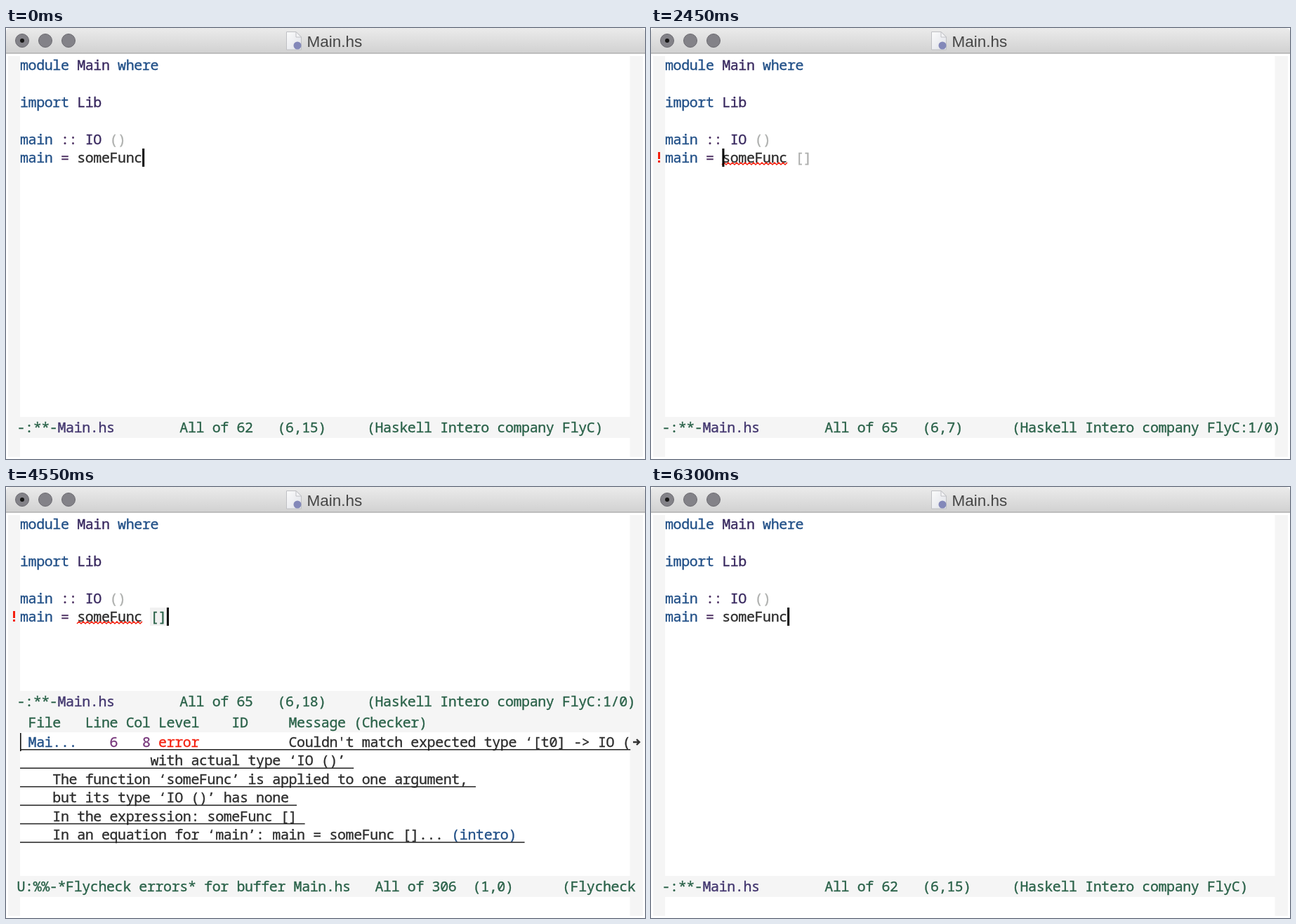
An HTML page that plays this animation: 910x615 px, repeating every 7.35 s.

```html
<!DOCTYPE html>
<html lang="en">
<head>
<meta charset="utf-8">
<title>Editor error checking</title>
<style>
html, body { margin: 0; width: 100%; height: 100%; overflow: hidden; background: #fff; }
svg { display: block; width: 910px; height: 615px; }
text { font: 20px "Noto Sans Mono", monospace; letter-spacing: -.41px; white-space: pre; color: #2d2d2d; }
text, tspan { fill: currentColor; stroke: currentColor; stroke-width: .35px; }
.title { font: 22.5px "Liberation Sans", Arial, sans-serif; letter-spacing: 0; color: #464646; stroke: none; }
.key { color: #204f87; }
.type { color: #38285f; }
.op { color: #4b2f61; }
.dim { color: #aeb0ae; }
.mode { color: #2a6249; }
.buffer { color: #43376f; }
.number { color: #78387c; }
.error { color: #f5200f; }
.wave { fill: none; stroke: #f5200f; stroke-width: 1.5; }
</style>
</head>
<body>
<svg viewBox="0 0 910 615">
  <defs>
    <linearGradient id="bar" x2="0" y2="1">
      <stop stop-color="#ebebeb"/><stop offset="1" stop-color="#d1d1d1"/>
    </linearGradient>
    <linearGradient id="page" x2="1" y2="1">
      <stop stop-color="#fbfbfb"/><stop offset="1" stop-color="#dfe1e8"/>
    </linearGradient>
  </defs>
  <path d="M0 36V6Q0 0 6 0H904Q910 0 910 6V36Z" fill="url(#bar)"/>
  <path d="M0 36H910" stroke="#b0b0b0" stroke-width="1.5"/>
  <g fill="#838288" stroke="#6c6b71">
    <circle cx="23" cy="18" r="9.5"/><circle cx="56" cy="18" r="9.5"/><circle cx="89" cy="18" r="9.5"/>
  </g>
  <circle cx="23" cy="18" r="3" fill="#161616"/>
  <path d="M399.5 5.5H413L420.5 13V31H399.5Z" fill="url(#page)" stroke="#bfc0c4"/>
  <path d="M413 5.5V13H420.5Z" fill="#f4f4f6" stroke="#bfc0c4"/>
  <circle cx="415" cy="25" r="5.5" fill="#8388b9"/>
  <text class="title" x="428.5" y="26.5">Main.hs</text>
  <path d="M3 40H20V612H3ZM888.5 40H907V612H888.5Z" fill="#f5f5f5"/>
  <g id="screen"></g>
</svg>
<script>
const LOOP = 7350, CELL = 11.59, ROW = 26.45, LEFT = 20;
const screen = document.getElementById("screen");

// Each step changes only the listed parts of the state before it.
const steps = [
  { at: 0, tail: "", size: 62, col: 15, match: false, errorRow: 0, popup: "", saved: false },
  { at: 350, tail: " [", size: 64, col: 17 },
  { at: 700, tail: " []", size: 65, col: 18, saved: true },
  { at: 1050, match: true, errorRow: 6 },
  { at: 1400, saved: false },
  { at: 2100, col: 17, match: false },
  { at: 2450, col: 7 },
  { at: 2800, popup: "message" },
  { at: 4200, popup: "", col: 18, match: true },
  { at: 4550, popup: "mismatch" },
  { at: 4900, tail: " [", size: 64, col: 17, match: false },
  { at: 5250, errorRow: 7, popup: "parse", saved: true },
  { at: 5600, tail: " ", size: 63, col: 16, errorRow: 0, popup: "empty" },
  { at: 5950, tail: "", size: 62, col: 15, saved: false },
  { at: 6300, popup: "" }
];
steps.forEach((step, i) => { steps[i] = { ...steps[i - 1], ...step }; });

const details = [
  " ".repeat(16) + "with actual type ‘IO ()’",
  "    The function ‘someFunc’ is applied to one argument,",
  "    but its type ‘IO ()’ has none",
  "    In the expression: someFunc []",
  "    In an equation for ‘main’: main = someFunc []"
];

const column = n => LEFT + n * CELL;
const span = (cls, s) => `<tspan class="${cls}">${s}</tspan>`;
const text = (x, y, content, cls = "") => `<text x="${x}" y="${y}" class="${cls}">${content}</text>`;
const rect = (x, y, w, h, fill) => `<rect x="${x}" y="${y}" width="${w}" height="${h}" fill="${fill}"/>`;
const lines = (y, list) => list.map((s, i) => text(LEFT, y + i * ROW, s)).join("");
const thinCursor = y => rect(20, y, 1.6, 26, "#111");

function wave(from, to, y) {
  let d = `M${from} ${y + 3}`;
  for (let x = from + 3, up = true; x <= to; x += 3, up = !up) d += `L${x} ${up ? y : y + 3}`;
  return `<path class="wave" d="${d}"/>`;
}

function modeLine(y, flags, name, size, position, modes) {
  const status = `All of ${size}`.padEnd(12) + position.padEnd(11) + modes;
  return rect(3, y, 904, 30, "#f5f5f5") + text(15.5, y + 22, `${flags}${name}   ${status}`, "mode");
}

function code(s) {
  const tail = s.match ? ` ${span("mode", "[]")}` : span("dim", s.tail);
  const rows = [
    `${span("key", "module")} ${span("type", "Main")} ${span("key", "where")}`,
    "",
    `${span("key", "import")} ${span("type", "Lib")}`,
    "",
    `${span("key", "main")} ${span("op", "::")} ${span("type", "IO")} ${span("dim", "()")}`,
    `${span("key", "main")} ${span("op", "=")} someFunc${tail}`
  ];
  let out = s.match ? rect(205, 172, 23.5, 26, "#f1f1f1") : "";
  out += lines(59.8, rows);
  if (s.errorRow) {
    const top = 177 + (s.errorRow - 6) * 27;
    out += rect(10, top, 3, 10, "#f5200f") + rect(10, top + 12, 3, 3, "#f5200f");
    out += s.errorRow === 6 ? wave(101, 194, 192) : wave(20, 32, 218.5);
  }
  return out + rect(column(s.col) + .3, 172, 3, 26, "#000");
}

function errorRow(line, col, message) {
  const cells = " " + span("key", "Mai...") + "    " + span("number", line) + "   " +
    span("number", col) + " " + span("error", "error") + " ".repeat(11) + message;
  return text(LEFT, 371, cells) +
    '<path d="M893 364H902M898 360L902 364L898 368" fill="none" stroke="#333" stroke-width="2.4"/>';
}

function errorList(kind) {
  const size = { mismatch: 306, parse: 113, empty: 0 }[kind];
  const header = " File   Line Col Level    ID     Message (Checker)";
  let out = rect(3, 321, 904, 29, "#f5f5f5") + text(LEFT, 343, header, "mode");
  if (kind === "parse") out += errorRow(8, 1, "parse error (possibly incorrect indentatio");
  if (kind === "mismatch") {
    const tail = "... ", link = "(intero)";
    out += errorRow(6, 8, "Couldn't match expected type ‘[t0] -> IO (");
    out += lines(371 + ROW, details.map((s, i) => i === 4 ? s + tail + span("key", link) : s));
    const ends = [75, ...details.map((s, i) => s.length + 1 + (i === 4 ? tail.length + link.length : 0))];
    out += ends.map((n, i) => rect(LEFT, 374 + i * ROW, n * CELL, 1.5, "#222")).join("");
  }
  return out + thinCursor(351) +
    modeLine(555, "U:%%-", "*Flycheck errors* for buffer Main.hs", size, "(1,0)", "(Flycheck");
}

function messageWindow() {
  return lines(341, ["Couldn't match expected type ‘[t0] -> IO ()’", ...details]) + thinCursor(321) +
    modeLine(555, "U:**-", span("buffer", "*Flycheck error messages*"), 260, "(1,0)", "(Fundamental)");
}

function draw(s) {
  const checker = s.errorRow ? "FlyC:1/0" : "FlyC";
  let out = code(s) + modeLine(s.popup ? 291 : 555, "-:**-", span("buffer", "Main.hs") + " ".repeat(5),
    s.size, `(6,${s.col})`, `(Haskell Intero company ${checker})`);
  if (s.popup) out += s.popup === "message" ? messageWindow() : errorList(s.popup);
  if (s.saved) out += text(LEFT, 605.5, "Wrote /Users/pilot/Work/intero-demo/app/Main.hs");
  screen.innerHTML = out;
}

let shown;
function tick() {
  const time = performance.now() % LOOP;
  const step = steps.findLast(s => s.at <= time);
  if (step !== shown) draw(shown = step);
  requestAnimationFrame(tick);
}
tick();
</script>
</body>
</html>
```
